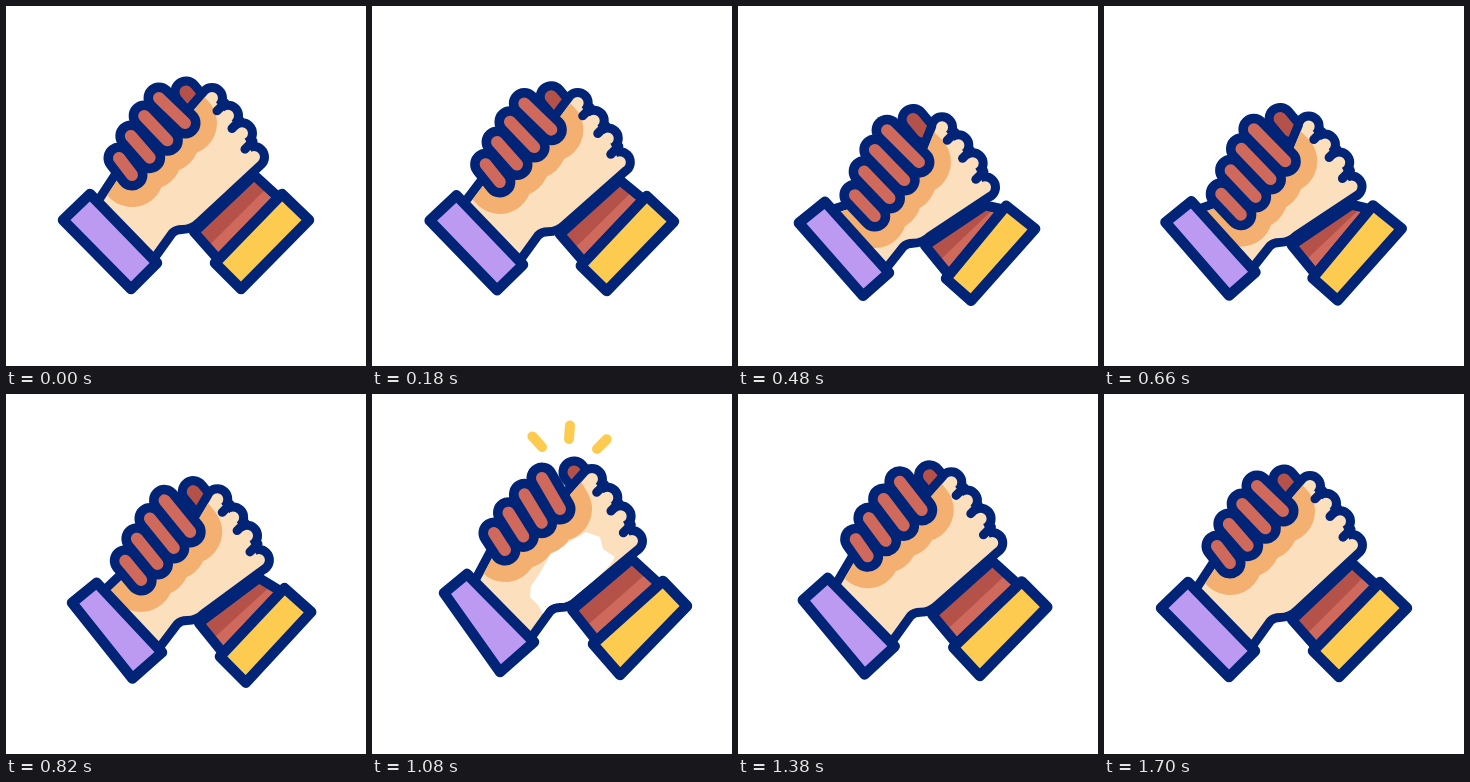
An HTML page with a canvas that plays this animation: 360x360 px, repeating every 2400 ms.

```html
<!DOCTYPE html>
<html lang="en">
<head>
<meta charset="utf-8">
<title>Hand clasp</title>
<style>
  html, body { margin: 0; width: 100%; height: 100%; overflow: hidden; background: #fff; }
  canvas { display: block; width: 100vmin; height: 100vmin; }
</style>
</head>
<body>
<canvas id="stage" width="360" height="360"></canvas>
<script>
const ctx = document.getElementById('stage').getContext('2d');
const LOOP = 2400, STEP = 20;
const NAVY = '#012476', SKIN = '#fcdfbd', SHADE = '#f3b071', RED = '#cf695b',
      BROWN = '#b4524a', LILAC = '#bc9af2', YELLOW = '#fdcb50';

// Joints in each pose. Cuffs: left, top, right, bottom corner (yellow starts at left too).
// Fingers: first finger root and tip, last finger root and tip.
const REST = {
  lilac: [[57, 214], [84, 188], [151, 257], [125, 283]],
  yellow: [[209, 257], [276, 188], [303, 214], [235, 283]],
  fingers: [[153, 92], [179, 117], [113, 152], [126, 169]],
  hand: [[180, 86], [206, 92], [248, 151], [178, 224]]
};
const LOW = {
  lilac: [[61, 217], [87, 196], [151, 267], [125, 290]],
  yellow: [[208, 273], [268, 200], [297, 223], [233, 295]],
  fingers: [[149, 125], [181, 157], [117, 190], [137, 211]],
  hand: [[175, 114], [204, 122], [247, 182], [177, 238]]
};
const HIGH = {
  lilac: [[72, 199], [95, 180], [162, 248], [128, 278]],
  yellow: [[221, 250], [291, 187], [315, 212], [248, 281]],
  fingers: [[170, 84], [188, 115], [122, 139], [133, 156]],
  hand: [[202, 78], [220, 85], [260, 147], [190, 214]]
};
const MOVES = [[0, 560, REST, LOW], [560, 1100, LOW, HIGH], [1100, 1670, HIGH, REST]];

const clamp = u => Math.max(0, Math.min(1, u));
const smooth = u => { u = clamp(u); return u * u * (3 - 2 * u); };
const ease = u => u < 0.5 ? 0.5 * (2 * u) ** 2.5 : 1 - 0.5 * (2 - 2 * u) ** 2.5;
const mix = (a, b, k) => [a[0] + (b[0] - a[0]) * k, a[1] + (b[1] - a[1]) * k];
const add = (p, x, y) => [p[0] + x, p[1] + y];

function poseAt(t) {
  const move = MOVES.find(m => t < m[1]);
  if (!move) return REST;
  const [start, end, from, to] = move;
  const k = ease((t - start) / (end - start));
  const pose = {};
  for (const part in from) pose[part] = from[part].map((p, i) => mix(p, to[part][i], k));
  return pose;
}

function polygon(points) {
  const path = new Path2D();
  points.forEach(p => path.lineTo(...p));
  path.closePath();
  return path;
}

function outlined(path, color, width) {
  ctx.strokeStyle = NAVY;
  ctx.lineWidth = width;
  ctx.stroke(path);
  ctx.fillStyle = color;
  ctx.fill(path);
}

function bar(a, b, width, color) {
  ctx.strokeStyle = color;
  ctx.lineWidth = width;
  ctx.beginPath();
  ctx.moveTo(...a);
  ctx.lineTo(...b);
  ctx.stroke();
}

function cuff(corners, color) {
  const path = polygon(corners);
  ctx.fillStyle = color;
  ctx.fill(path);
  ctx.strokeStyle = NAVY;
  ctx.lineWidth = 10.5;
  ctx.stroke(path);
}

function darkArm({ hand, yellow }) {
  const near = [add(hand[2], 0, 18), add(hand[3], 10, 2)];
  const far = [mix(yellow[1], yellow[0], 0.05), mix(yellow[1], yellow[0], 0.95)];
  const arm = polygon([near[0], far[0], far[1], near[1]]);
  ctx.fillStyle = BROWN;
  ctx.fill(arm);
  ctx.fillStyle = RED;
  ctx.fill(polygon([mix(near[0], far[0], 0.55), far[0], far[1], mix(near[1], far[1], 0.55)]));
  ctx.strokeStyle = NAVY;
  ctx.lineWidth = 10;
  ctx.stroke(arm);
}

function darkThumb({ hand }) {
  const end = add(hand[0], 10, 12);
  bar(hand[0], end, 31, NAVY);
  bar(hand[0], end, 13, BROWN);
}

function fingerBars({ fingers: [rootA, tipA, rootD, tipD] }) {
  return [0, 1, 2, 3].map(i => {
    const inner = i % 3 ? 1 : 0;
    return [add(mix(rootA, rootD, i / 3), -1.5 * inner, -2 * inner), mix(tipA, tipD, i / 3)];
  });
}

function lightHand(pose, bars, glare) {
  const { hand: [, first, last, crotch], lilac, fingers } = pose;
  const knuckles = [first, add(mix(first, last, 1 / 3), 2, -2),
                    add(mix(first, last, 2 / 3), 2, -4), last];
  const wrist = k => mix(lilac[1], lilac[2], k);
  const at = (x, y) => add(crotch, x, y);

  const skin = new Path2D();
  [wrist(0.16), add(fingers[2], 6, 10), fingers[1], add(fingers[1], 8, -12),
   add(first, -4.2, -4.2), ...knuckles, add(last, 4.2, 4.2), at(12, -11)]
    .forEach(p => skin.lineTo(...p));
  skin.quadraticCurveTo(...at(6, -5), ...at(-2, -5));
  skin.quadraticCurveTo(...at(-10, -5), ...at(-15, 0));
  skin.lineTo(...wrist(0.9));
  skin.closePath();
  for (const [x, y] of knuckles) {
    skin.moveTo(x + 6, y);
    skin.arc(x, y, 6, 0, Math.PI * 2);
  }
  outlined(skin, SKIN, 18);

  ctx.save();
  ctx.clip(skin);
  if (glare) {
    ctx.fillStyle = '#fff';
    ctx.fill(polygon([[180, 158], [214, 138], [228, 143], [231, 155], [243, 163], [238, 171],
                      [198, 211], [172, 222], [166, 211], [158, 203], [159, 192], [166, 182]]));
  }
  for (const [root, tip] of bars) bar(mix(root, tip, 0.7), tip, 64, SHADE);
  ctx.restore();

  for (let i = 0; i < 3; i++) {
    const gap = mix(knuckles[i], knuckles[i + 1], 0.5);
    bar(add(gap, 5, -4), add(gap, -3, 4), 9, NAVY);
  }
}

function sparks(t) {
  const head = 1.3 * smooth((t - 1000) / 120);
  const tail = 1.3 * smooth((t - 1090) / 130);
  if (head - tail < 0.02) return;
  for (const [base, tip] of [[[170, 53], [160, 42]], [[197, 45], [198, 31]], [[225, 55], [235, 45]]])
    bar(mix(base, tip, tail), mix(base, tip, head), 10, YELLOW);
}

function draw(t) {
  const pose = poseAt(t);
  const bars = fingerBars(pose);
  ctx.clearRect(0, 0, 360, 360);
  ctx.lineCap = ctx.lineJoin = 'round';
  darkArm(pose);
  darkThumb(pose);
  lightHand(pose, bars, t >= 1060 && t < 1120);
  bars.forEach(([root, tip]) => bar(root, tip, 31, NAVY));
  bars.forEach(([root, tip]) => bar(root, tip, 12, RED));
  cuff(pose.lilac, LILAC);
  cuff(pose.yellow, YELLOW);
  sparks(t);
}

const begin = performance.now();
function tick() {
  const t = (performance.now() - begin) % LOOP;
  draw(Math.floor(t / STEP) * STEP);
  requestAnimationFrame(tick);
}
tick();
</script>
</body>
</html>
```
